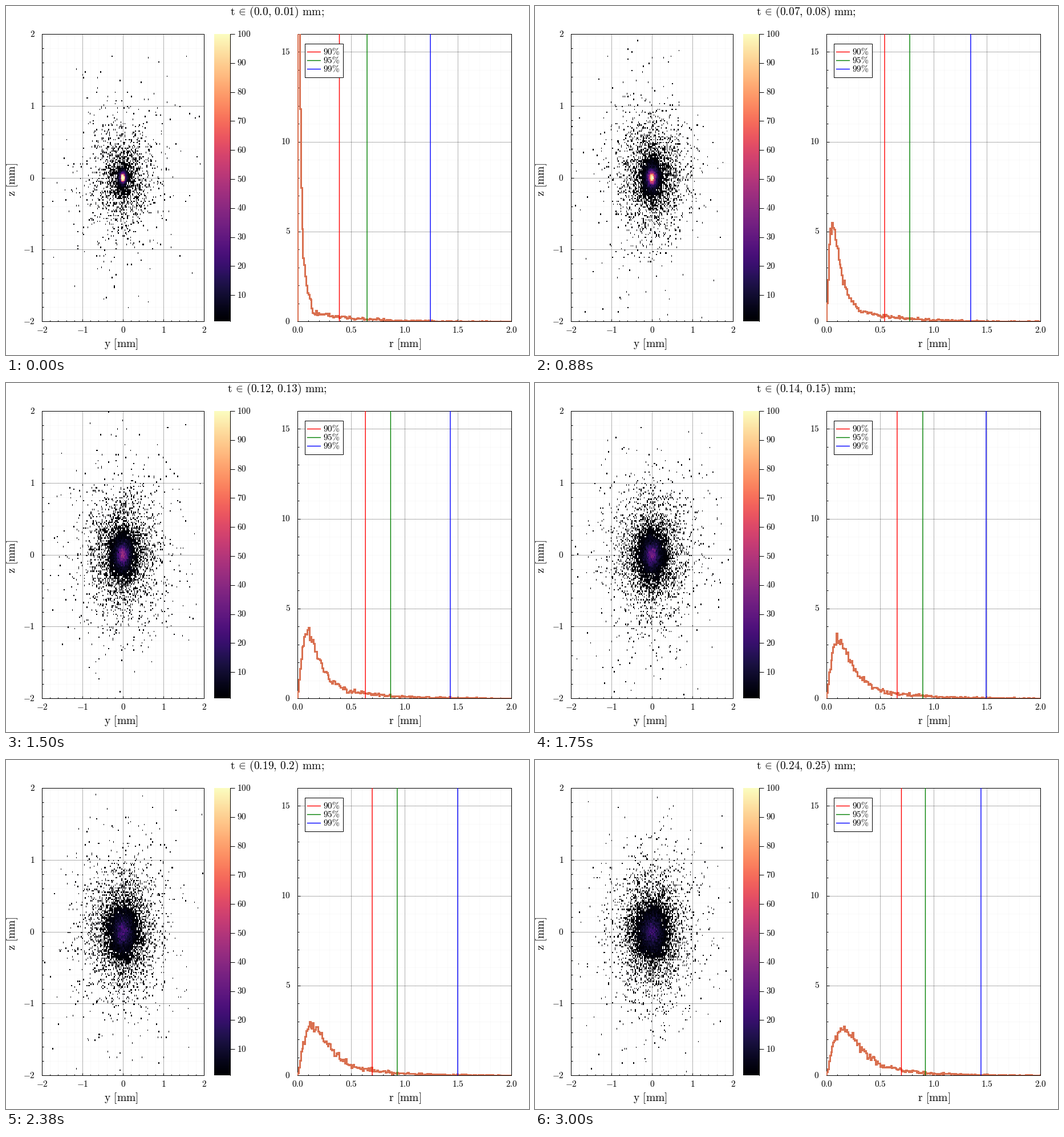
Write a matplotlib script that moves like this. It is 917 by 611 pixels and loops after 3.12 s.

```python
import matplotlib.pyplot as plt
import numpy as np
from matplotlib.animation import FuncAnimation

W, H, DPI = 917, 611, 128
PX = 72 / DPI                      # points per pixel
FRAMES, LOOP = 25, 3120
COUNT = 10000
SMALL, LARGE = 15.3, 19.5          # text heights in pixels
SPACE, THIN = r"\hspace{0.38}", r"\hspace{0.18}"
COLORS = ["red", "green", "blue"]

plt.rcParams["mathtext.fontset"] = "cm"

# frame -> (core exponent, 90 %, 95 % and 99 % radius in mm)
KEYS = {
    0: (0.31, 0.392, 0.651, 1.243),
    3: (0.43, 0.480, 0.731, 1.248),
    7: (0.57, 0.544, 0.779, 1.349),
    10: (0.65, 0.611, 0.843, 1.368),
    14: (0.84, 0.661, 0.901, 1.493),
    19: (1.05, 0.699, 0.933, 1.499),
    24: (1.20, 0.701, 0.925, 1.445),
}


def key_radius(key, u):
    """Radius below which the share u of all hits lies."""
    m, q90, q95, q99 = KEYS[key]
    shoulder = 2 * q90 - q95
    far = q99 + (q99 - q95) * np.log(100) / np.log(5)
    # power-law core up to 80 %, exponential pieces beyond
    scale = shoulder / np.sqrt(0.2 ** (-1 / m) - 1)
    core = scale * np.sqrt((1 - u) ** (-1 / m) - 1)
    rest = np.array([0.2, 0.1, 0.05, 0.01, 0.0001])
    tail = np.interp(-np.log(1 - u), -np.log(rest), [shoulder, q90, q95, q99, far])
    return np.where(u < 0.8, core, tail)


def radius_at(frame, u):
    """Blend the two neighbouring keys on a log scale."""
    keys = list(KEYS)
    i = min(np.searchsorted(keys, frame, side="right") - 1, len(keys) - 2)
    a, b = keys[i], keys[i + 1]
    k = (frame - a) / (b - a)
    return key_radius(a, u) ** (1 - k) * key_radius(b, u) ** k


def label(x, y, body, size=SMALL, ha="center", va="baseline", **kw):
    return fig.text(x / W, 1 - y / H, f"${body}$", fontsize=size * PX,
                    ha=ha, va=va, **kw)


def panel(x0, x1, xlim, ylim):
    ax = fig.add_axes([x0 / W, 1 - 552 / H, (x1 - x0) / W, 503 / H])
    ax.set(xlim=xlim, ylim=ylim)
    ax.patch.set_alpha(0)
    ax.tick_params(which="both", direction="in", width=PX,
                   labelbottom=False, labelleft=False)
    ax.tick_params(which="major", length=4.5 * PX)
    ax.tick_params(which="minor", length=2.5 * PX)
    for spine in ax.spines.values():
        spine.set(linewidth=PX, zorder=1)
    return ax


def add_grid(ax, xticks, xminor, yticks, yminor):
    ax.set_axisbelow(True)
    ax.set_xticks(xticks)
    ax.set_yticks(yticks)
    ax.set_xticks(xminor, minor=True)
    ax.set_yticks(yminor, minor=True)
    ax.grid(which="major", color="black", alpha=0.3, lw=PX)
    ax.grid(which="minor", color="black", alpha=0.022, lw=PX)


fig = plt.figure(figsize=(W / DPI, H / DPI), dpi=DPI, facecolor="white")

# hit map
hit_ax = panel(63, 347, (-2, 2), (-2, 2))
fifths = np.arange(-9, 10) * 0.2
add_grid(hit_ax, range(-2, 3), fifths, range(-2, 3), fifths)
edges = np.linspace(-2, 2, 201)
hits = hit_ax.imshow(np.zeros((200, 200)), cmap="magma", vmin=1, vmax=100,
                     origin="lower", extent=(-2, 2, -2, 2), aspect="auto",
                     interpolation="nearest", zorder=2)
for v in range(-2, 3):
    label(50.5, 305.6 - 125.75 * v, v, ha="right")
    label(205.2 + 71 * v, 571.5, v)
label(202, 597, r"\mathrm{y" + SPACE + "[mm]}", LARGE)
label(11.5, 304, r"\mathrm{z" + SPACE + "[mm]}", LARGE, va="center", rotation=90)

# colour bar
bar_ax = panel(365, 393, (0, 1), (1, 100))
bar_ax.imshow(np.linspace(1, 100, 256)[:, None], cmap="magma", origin="lower",
              extent=(0, 1, 1, 100), aspect="auto", interpolation="nearest", zorder=0)
for side in ("left", "top", "bottom"):
    bar_ax.spines[side].set_visible(False)
bar_ax.yaxis.tick_right()
bar_ax.set_xticks([])
bar_ax.set_yticks(range(10, 101, 10))
bar_ax.tick_params(axis="y", direction="out", length=8 * PX, labelright=False)
for v in range(10, 101, 10):
    label(405, 53.5 + (100 - v) * 503 / 99, v, ha="left")

# radial profile
rad_ax = panel(511, 886, (0, 2), (0, 16))
add_grid(rad_ax, np.arange(5) * 0.5, np.arange(1, 20) * 0.1,
         range(0, 16, 5), range(1, 16))
r_edges = np.arange(251) * 0.01
profile = rad_ax.stairs(np.zeros(250), r_edges, color="#d97050",
                        lw=3 * PX, zorder=2)
lines = [rad_ax.axvline(0, color=c, lw=1.4 * PX, zorder=3, snap=False)
         for c in COLORS]
for v in range(5):
    label(511.6 + 93.75 * v, 571.5, f"{v / 2:.1f}")
for v in (0, 5, 10, 15):
    label(498.5, 556.6 - 31.44 * v, v, ha="right")
label(699.5, 597, r"\mathrm{r" + SPACE + "[mm]}", LARGE)

# legend
key_ax = fig.add_axes([0, 0, 1, 1])
key_ax.set(xlim=(0, W), ylim=(H, 0))
key_ax.axis("off")
key_ax.add_patch(plt.Rectangle((524, 66), 67, 59, fc="white", ec="black", lw=PX))
for i, (color, share) in enumerate(zip(COLORS, (90, 95, 99))):
    y = 80.5 + 15 * i
    key_ax.plot([528, 552], [y, y], color=color, lw=1.4 * PX,
                solid_capstyle="butt", snap=False)
    label(556.5, y + 5, rf"{share}\%", ha="left")

title = label(475.5, 16, "", LARGE)


def draw(frame):
    rng = np.random.default_rng(100 + frame)
    r = radius_at(frame, rng.random(COUNT))
    phi = rng.uniform(0, 2 * np.pi, COUNT)
    grid, _, _ = np.histogram2d(r * np.sin(phi), r * np.cos(phi), bins=(edges, edges))
    hits.set_data(np.ma.masked_equal(grid, 0))
    profile.set_data(np.histogram(r, r_edges)[0] / (COUNT * 0.01))
    for line, q in zip(lines, radius_at(frame, np.array([0.9, 0.95, 0.99]))):
        line.set_xdata([q, q])
    low, high = round(frame / 100, 2), round((frame + 1) / 100, 2)
    title.set_text(r"$\mathrm{t" + THIN + r"\in" + THIN + f"({low},{THIN}{high})"
                   + SPACE + r"mm;}\hspace{-0.2}$")
    return [hits, profile, title, *lines]


anim = FuncAnimation(fig, draw, frames=FRAMES, interval=LOOP / FRAMES,
                     init_func=lambda: draw(0), repeat=True, repeat_delay=0)
plt.show()
```
